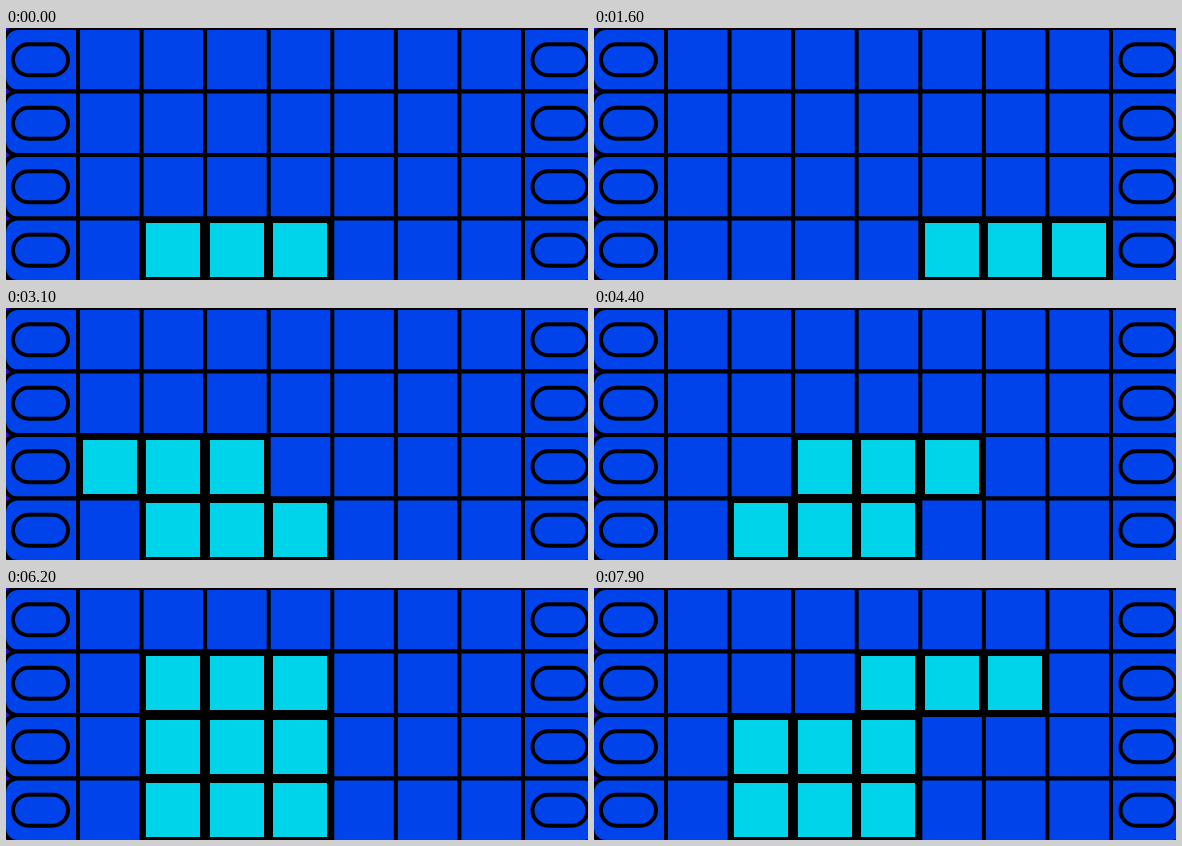
These frames come from a looping animation (582x252 px, 8000 ms). An HTML page with a canvas:

```html
<!DOCTYPE html>
<html lang="en">
<head>
<meta charset="utf-8">
<title>Stacker</title>
<style>
html, body { margin: 0; width: 582px; height: 252px; overflow: hidden; background: #0043ea; }
canvas { display: block; }
</style>
</head>
<body>
<canvas id="stage" width="582" height="252"></canvas>
<script>
const ctx = document.getElementById('stage').getContext('2d');
const LOOP = 8000;
const BLUE = '#0043ea', CYAN = '#00d4ea', PURPLE = '#2a0cd8';
const LEFT = 72, CELL = 63.57, ROW = 63.5, COLS = 7, ROWS = 4;

// The bar rests one extra tick at each end before turning round.
const SWEEP = [0, 0, 1, 2, 3, 4, 4, 3, 2, 1];
const STOP_COL = 1;
const DROPS = [2900, 6150];

function barColumn(t) {
  const tick = t < 3090
    ? Math.floor((t - 90) / 300)
    : 10 + Math.floor((t - 3090) / 335);
  return SWEEP[(tick + 10) % 10];
}

function roundBox(x, y, w, h, r) {
  ctx.beginPath();
  ctx.roundRect(x, y, w, h, r);
}

function drawPill(cx, cy) {
  roundBox(cx - 27.5, cy - 15.5, 55, 31, 15.5);
  ctx.stroke();
}

function drawBoard() {
  ctx.fillStyle = PURPLE;
  ctx.fillRect(0, 0, 582, 252);
  ctx.strokeStyle = '#000';
  ctx.lineWidth = 4;
  for (let r = 0; r < ROWS; r++) {
    const y = r * ROW;
    ctx.fillStyle = BLUE;
    roundBox(-2, y, 594, ROW, 14);
    ctx.fill();
    ctx.stroke();
    drawPill(34.5, y + 31.75);
    drawPill(554, y + 31.75);
  }
  ctx.fillStyle = '#000';
  for (let c = 0; c <= COLS; c++) {
    ctx.fillRect(LEFT + c * CELL - 2, 0, 4, 252);
  }
}

function drawBar(level, col) {
  const cy = (ROWS - 1 - level + 0.5) * ROW;
  for (let c = col; c < col + 3; c++) {
    const cx = LEFT + (c + 0.5) * CELL;
    ctx.fillStyle = '#000';
    ctx.fillRect(Math.round(cx - 33.2), Math.round(cy - 33.2), 66, 66);
    ctx.fillStyle = CYAN;
    ctx.fillRect(Math.round(cx - 27.2), Math.round(cy - 27.2), 54, 54);
  }
}

function draw(t) {
  const level = DROPS.filter(d => t >= d).length;
  drawBoard();
  for (let i = 0; i < level; i++) drawBar(i, STOP_COL);
  drawBar(level, barColumn(t));
}

function frame() {
  draw(performance.now() % LOOP);
  requestAnimationFrame(frame);
}
frame();
</script>
</body>
</html>
```
